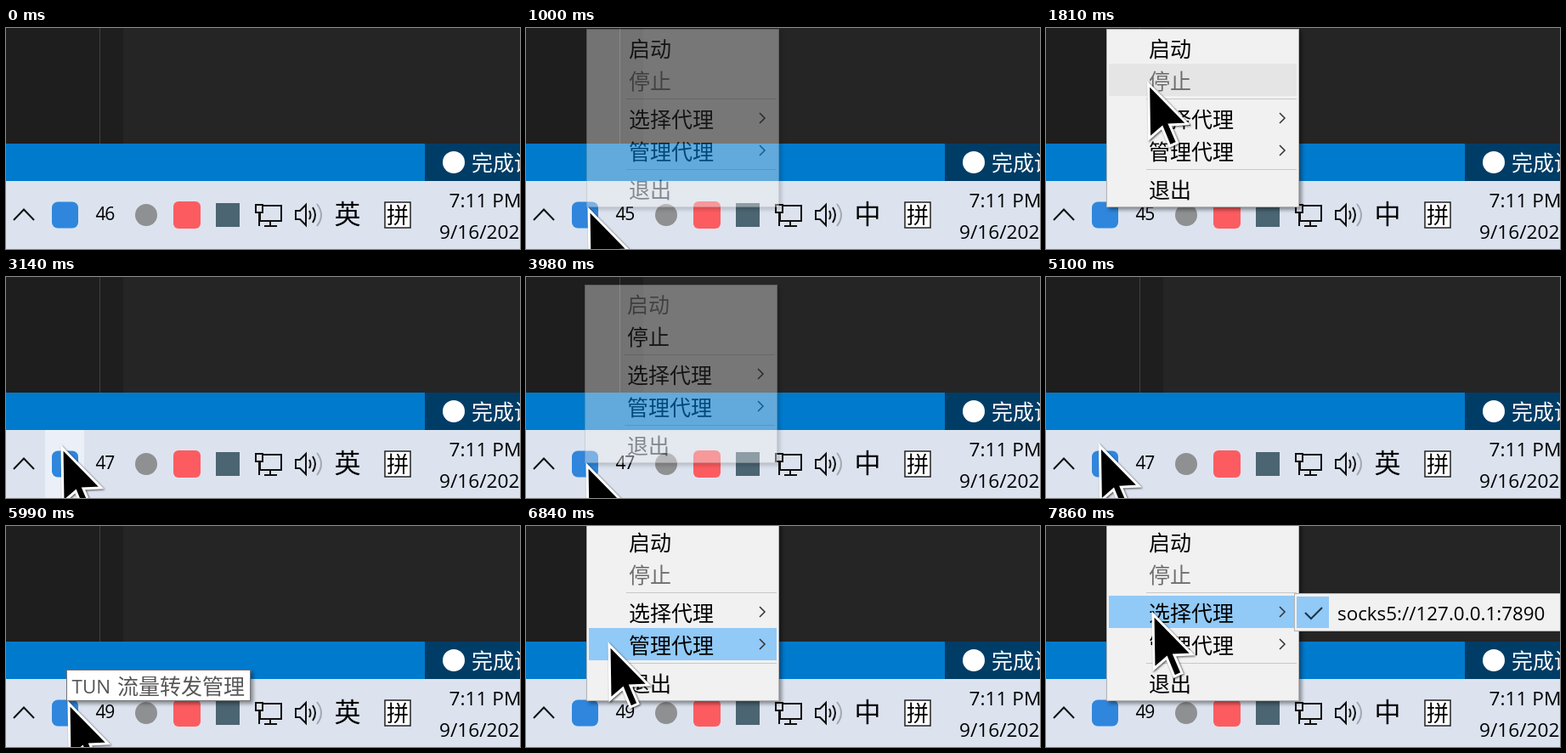
Animation, 605 px wide and 260 px high, one loop 8000 ms. Source, as an HTML page:

```html
<!DOCTYPE html>
<html lang="zh">
<head>
<meta charset="utf-8">
<style>
  html, body { margin: 0; width: 100%; height: 100%; overflow: hidden; background: #252526; }
  svg { display: block; width: 605px; height: 260px; font: 25px "Open Sans", "Noto Sans CJK SC", sans-serif; }
  .latin { font-size: 22.4px; }
  .clock { font-size: 22.7px; }
  .line { fill: none; stroke: #111; stroke-width: 2; }
  .panel { fill: #f1f1f1; stroke: #b4b4b4; }
  .soft { filter: drop-shadow(3px 3px 2px #0006); }
</style>
</head>
<body>
<svg viewBox="0 0 605 260">
  <rect width="605" height="136" fill="#252526"/>
  <rect width="138" height="136" fill="#1e1e1e"/>
  <rect x="110" width="1" height="136" fill="#414141"/>
  <rect y="136" width="605" height="44" fill="#007acc"/>
  <rect x="493" y="136" width="112" height="44" fill="#003d66"/>
  <circle cx="527" cy="158" r="13" fill="#fff"/>
  <text x="548" y="168" fill="#fff">完成设置</text>

  <rect y="180" width="605" height="80" fill="#dce3ef"/>
  <rect id="hover" x="46" y="180" width="46" height="80" fill="#ebf0f8"/>
  <path class="line" d="M9 226L21 213.500L33 226"/>
  <rect x="54" y="204.500" width="31" height="31" rx="7" fill="#2f86dc"/>
  <text id="count" x="105.500" y="226" font-size="21" font-weight="500" letter-spacing="-1.2"></text>
  <circle cx="165" cy="220" r="13" fill="#8f9091"/>
  <rect x="197" y="204" width="32" height="32" rx="6" fill="#fc5c60"/>
  <rect x="247" y="206" width="28" height="28" fill="#4b6572"/>
  <path class="line" d="M302 209H324V227H299V218M311 227V233M304 233H319M294 208H302V217H294ZM298 217V233"/>
  <path class="line" d="M341 215H346L353 208V232L346 225H341ZM357 215Q360 220 357 225M361 211Q367 220 361 229"/>
  <path class="line" d="M366 207Q376 220 366 233" style="stroke:#a4a9b2"/>
  <text id="ime" x="402" y="229.500" font-size="31" text-anchor="middle"></text>
  <rect x="446" y="205" width="30" height="30" fill="#fff" stroke="#222" stroke-width="1.500"/>
  <text x="461" y="230" font-size="26" text-anchor="middle">拼</text>
  <text class="clock" x="521.500" y="211">7:11 PM</text>
  <text class="clock" x="510" y="248">9/16/2024</text>

  <g id="tip">
    <rect class="soft" x=".5" y=".5" width="216" height="36" fill="#fff" stroke="#767676"/>
    <g fill="#575757"><text class="latin" x="6.500" y="28">TUN</text><text x="60" y="28.500">流量转发管理</text></g>
  </g>

  <g id="menu">
    <rect class="panel soft" x=".5" y=".5" width="226" height="209"/>
    <rect id="light" x="3" width="221" height="38"/>
    <g id="items"></g>
  </g>

  <g id="sub">
    <rect class="panel" x="292.500" y="79.500" width="330" height="44"/>
    <rect x="295" y="83" width="38" height="37" fill="#91c9f7"/>
    <path class="line" d="M305 102L312 109L325 96" style="stroke:#1d3347"/>
    <text class="latin" x="343" y="111">socks5://127.0.0.1:7890</text>
  </g>

  <path id="cursor" d="M0 0L1 64L16 51L25 73L34 69L25 48L46 47Z" stroke="#fff" stroke-width="3"
    style="filter:drop-shadow(1px 1px 1px #000a)"/>
</svg>
<script>
const LOOP = 8000, ROW = 38;
const el = id => document.getElementById(id);
const ramp = (t, a, b) => Math.max(0, Math.min(1, (t - a) / (b - a)));
const easeOut = u => u * (2 - u);
const move = (node, x, y) => node.setAttribute('transform', `translate(${x} ${y})`);

// Menu rows: two gaps, a rule in each, and an arrow on the rows with a submenu.
const names = ['启动', '停止', '选择代理', '管理代理', '退出'];
const rowTop = i => 3 + ROW * i + 7 * ((i > 1) + (i > 3));
el('items').innerHTML = names.map((name, i) => {
  const y = rowTop(i);
  const rule = i && i % 2 === 0 ? `<path d="M47 ${y - 3.5}H224" stroke="#c8c8c8"/>` : '';
  const arrow = name.length > 2
    ? `<path d="M204 ${y + 13}l6 6l-6 6" fill="none" stroke="#333" stroke-width="1.5"/>` : '';
  return `<text x="50" y="${y + 29.5}">${name}</text>${rule}${arrow}`;
}).join('');
const labels = el('items').querySelectorAll('text');

// Pointer moves: start, end, and the place it goes to
const moves = [
  [300, 840, 71, 211], [1530, 2090, 133, 14], [2500, 3120, 63, 198], [3220, 3480, 66, 211],
  [3540, 3700, 69, 219], [4060, 4460, 151, 54], [4740, 5200, 56, 203], [5300, 5460, 71, 206],
  [6720, 6840, 95, 137], [6880, 7120, 123, 101]
];
const pointer = t => moves.reduce(([x, y], [a, b, toX, toY]) => {
  const u = easeOut(ramp(t, a, b));
  return [x + (toX - x) * u, y + (toY - y) * u];
}, [-54, 260]);

// Open and close times; each panel stands on the pointer's place at opening.
const menus = [[920, 2380], [3900, 4630], [6360, LOOP]];
const tips = [[3500, 3900], [5790, 6360]];

// Shows the panel that is on at time t; returns its index and top edge.
function popup(node, spans, height, fade, t) {
  const index = spans.findIndex(([open, close]) => t >= open && t < close + fade);
  node.style.opacity = 0;
  if (index < 0) return null;
  const [open, close] = spans[index], [x, y] = pointer(open);
  node.style.opacity = ramp(t, open, open + 200) * (1 - ramp(t, close, close + fade));
  move(node, x, y - height);
  return { index, top: y - height };
}

function draw(t) {
  const [x, y] = pointer(t);
  move(el('cursor'), x + 3, y + 3);
  popup(el('tip'), tips, 37, 1, t);
  const menu = popup(el('menu'), menus, 210, 120, t);
  if (menu) {
    const off = 1 - menu.index % 2;
    const at = y - menu.top;
    const row = names.findIndex((_, i) => at >= rowTop(i) && at < rowTop(i) + ROW);
    el('light').setAttribute('fill', row < 0 ? 'none' : row === off ? '#e5e5e5' : '#91c9f7');
    el('light').setAttribute('y', rowTop(row));
    labels.forEach((label, i) => label.setAttribute('fill', i === off ? '#6d6d6d' : '#000'));
  }
  el('ime').textContent = menu ? '中' : '英';
  el('count').textContent = t < 120 ? 46 : 45 + 2 * Math.floor((t - 120) / 2670);
  el('sub').style.opacity = ramp(t, 7340, 7530);
  el('hover').style.opacity = ramp(t, 2900, 3000) * (1 - ramp(t, 3220, 3900));
}

const start = performance.now();
function tick() {
  draw((performance.now() - start) % LOOP);
  requestAnimationFrame(tick);
}
tick();
</script>
</body>
</html>
```
